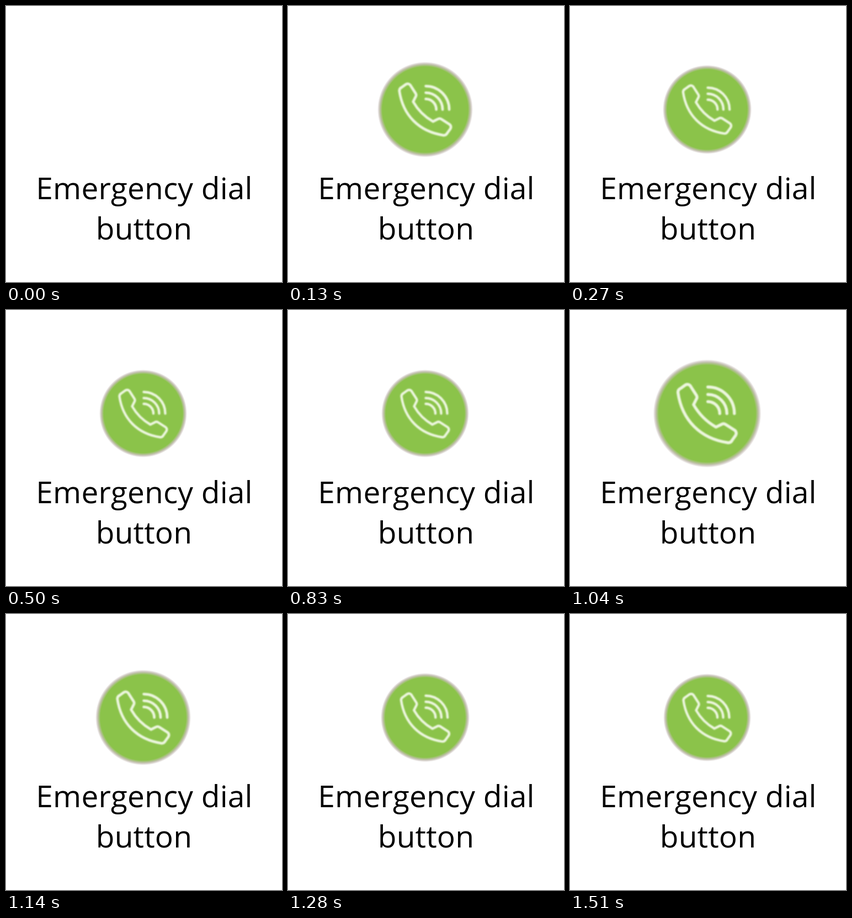
Write an HTML page that moves like this. It is 500x500 px and loops after 2020 ms.

```html
<!DOCTYPE html>
<html lang="en">
<head>
<meta charset="utf-8">
<title>Emergency dial button</title>
<style>
  html, body { margin: 0; height: 100%; overflow: hidden; background: #fff; }
  svg { display: block; width: 100vw; height: 100vh; }
  text { font: 55px "Open Sans", sans-serif; letter-spacing: .2px; text-anchor: middle; }
</style>
</head>
<body>
<svg viewBox="0 0 500 500">
  <defs>
    <radialGradient id="disc">
      <stop offset=".895" stop-color="#8bc34a"/>
      <stop offset=".945" stop-color="#bdc0a6"/>
      <stop offset=".967" stop-color="#d6d0cb"/>
      <stop offset="1" stop-color="#fff"/>
    </radialGradient>
    <filter id="soft"><feGaussianBlur stdDeviation="1"/></filter>
  </defs>
  <g id="button">
    <circle r="79.5" fill="url(#disc)"/>
    <g fill="none" stroke="#ecf6de" stroke-width="4.4" stroke-linecap="round" stroke-linejoin="round" filter="url(#soft)">
      <path d="M-43-31 Q-43-35-39-37 L-32-42 Q-28-44-25-41 L-16-27 Q-14-24-16-21 L-20-13
               Q-8 8 13 20 L21 16 Q24 14 27 16 L41 25 Q44 28 42 32
               L37 39 Q35 43 31 43 C-10 37-37 10-43-31Z"/>
      <path d="M1-39 A39 39 0 0 1 40 0 M1-28 A28 28 0 0 1 29 0 M1-17.5 A17.5 17.5 0 0 1 18.5 0"/>
    </g>
  </g>
  <text x="250.5" y="350">Emergency dial</text>
  <text x="250" y="423">button</text>
</svg>
<script>
  const LOOP = 2020, STEPS = 60, BEAT = 30, DECAY = 15;
  const button = document.getElementById("button");

  // Each beat jumps up, then settles with a quartic ease-out.
  function pulse(step) {
    const beat = step % BEAT;
    if (beat === 0 || beat >= DECAY) return 1;
    return 1 + 0.305 * (1 - beat / DECAY) ** 4;
  }

  function draw(now) {
    const time = now % LOOP;
    const step = Math.min(STEPS - 1, Math.floor((time + 7) * STEPS / LOOP));
    button.setAttribute("visibility", step ? "visible" : "hidden");
    button.setAttribute("transform", `translate(248.5 187.5) scale(${pulse(step)})`);
    requestAnimationFrame(draw);
  }

  draw(0);
</script>
</body>
</html>
```
